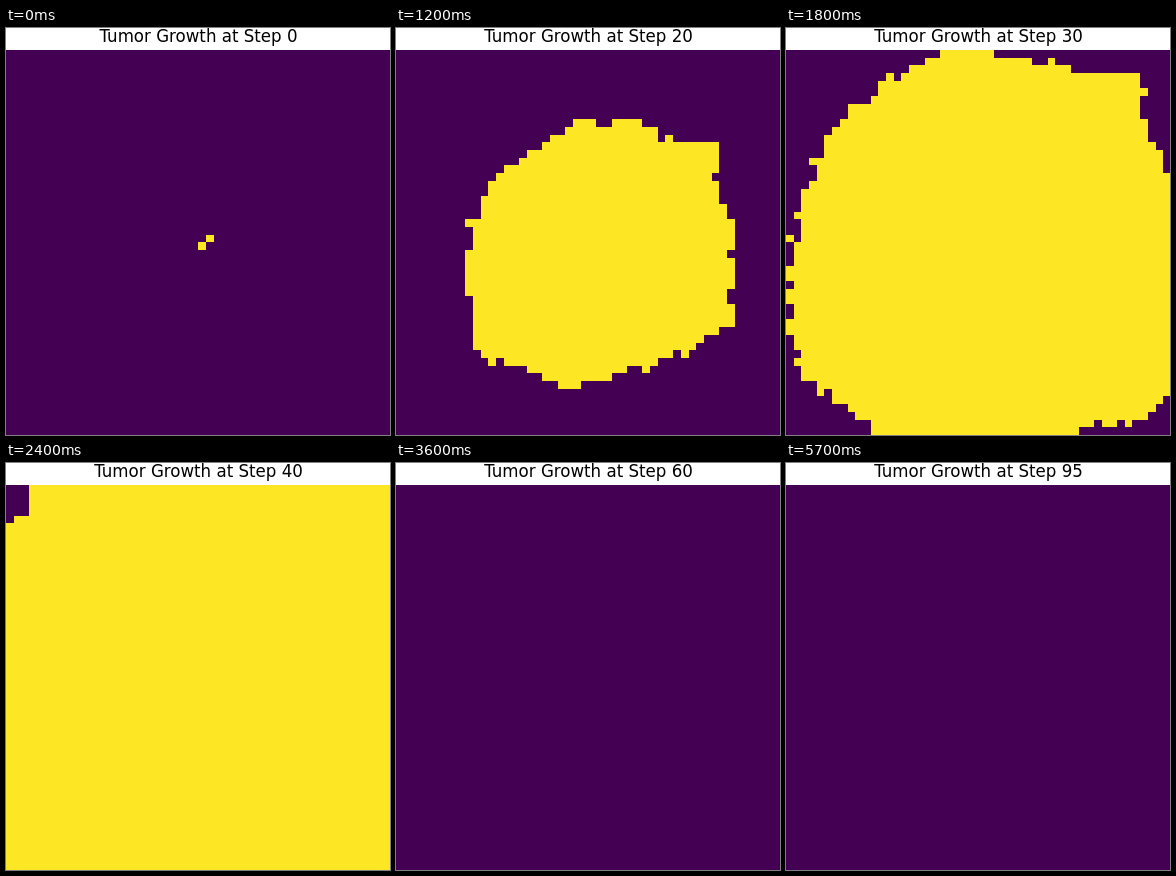
Animation, 384 px wide and 407 px high, one loop 6 s. Source, as an HTML page with a canvas:

```html
<!DOCTYPE html>
<html lang="en">
<head>
<meta charset="utf-8">
<title>Tumor Growth</title>
<style>
  html, body { margin: 0; width: 100%; height: 100%; overflow: hidden; background: #fff; }
  canvas, svg { position: absolute; left: 0; top: 0; width: 384px; height: 407px; }
  text { font: 16.667px "DejaVu Sans", sans-serif; text-anchor: middle; }
</style>
</head>
<body>
<canvas id="field" width="384" height="407"></canvas>
<svg viewBox="0 0 384 407">
  <text id="title" transform="translate(192.5 14) scale(1 1.06)">Tumor Growth at Step 0</text>
</svg>
<script>
const FRAME_MS = 300, LOOP_MS = 6000, STEPS_PER_FRAME = 5;
const GRID = 50, CELL = 7.7, TOP = 22;
const CENTER = { x: 26, y: 25 };
const ROUGHNESS = 1.2;
const FULL_STEP = 45;
const HEALTHY = '#440154', TUMOR = '#fde725';

// Corner points relative to the center, from points in grid units.
const outline = points => points.split(' ').map(point => {
  const [x, y] = point.split(',').map(Number);
  return { x: x - CENTER.x, y: y - CENTER.y };
});

// Rough shape of the tumor every ten steps; it may reach past the grid.
const outlines = [
  outline('25,26 25.95,24.95 27,24 26.05,25.05'),
  outline('26.5,16.3 35,19.4 35.6,23 33.2,25.5 35.3,30.5 31,34 24,33.2 17.3,34 19,29.5 18,24.5 21,20'),
  outline('23.5,8.8 32,9.5 35,11.7 41.7,12.3 41.7,18 44,24 44,35.3 36,40.3 21,44.2 18.5,42 11,40 9,30 10,22 13.5,16'),
  outline('23,-0.5 39,2.6 46,3.2 46.6,10 50,16 53,27 51,44 46,48.4 38,48.6 34,51 14,51 2,42.5 0,32 1.2,23 5.2,11 14,3.2'),
  outline('3.9,-0.3 25,-9 55,-5 60,27 55,55 25,60 -5,55 -9,30 0,5 3,3.6')
];

// Distance from the center to the rim in the unit direction u.
function rimDistance(points, u) {
  let farthest = 0;
  points.forEach((a, i) => {
    const b = points[(i + 1) % points.length];
    const sideA = u.x * a.y - u.y * a.x;
    const sideB = u.x * b.y - u.y * b.x;
    if ((sideA > 0) === (sideB > 0)) return;
    const k = sideA / (sideA - sideB);
    const distance = u.x * (a.x + (b.x - a.x) * k) + u.y * (a.y + (b.y - a.y) * k);
    farthest = Math.max(farthest, distance);
  });
  return farthest;
}

// Fixed for each cell, so that a cell never heals while the tumor grows.
function noise(col, row) {
  const n = Math.sin(col * 127.1 + row * 311.7) * 43758.5453;
  return n - Math.floor(n) - 0.5;
}

function isTumor(step, col, row) {
  const dx = col + 0.5 - CENTER.x, dy = row + 0.5 - CENTER.y;
  const distance = Math.hypot(dx, dy);
  const u = { x: dx / distance, y: dy / distance };
  const index = Math.floor(step / 10), mix = step % 10 / 10;
  const from = rimDistance(outlines[index], u);
  const to = mix ? rimDistance(outlines[index + 1], u) : from;
  return distance < from + (to - from) * mix + noise(col, row) * ROUGHNESS;
}

const ctx = document.getElementById('field').getContext('2d');
const title = document.getElementById('title');
const edge = i => Math.round(i * CELL - 0.01);

function draw(step) {
  title.textContent = 'Tumor Growth at Step ' + step;
  ctx.fillStyle = HEALTHY;
  ctx.fillRect(0, TOP, 384, 385);
  // A full grid is uniform, so it falls back to the lowest color.
  if (step >= FULL_STEP) return;
  ctx.fillStyle = TUMOR;
  for (let row = 0; row < GRID; row++) {
    for (let col = 0; col < GRID; col++) {
      if (!isTumor(step, col, row)) continue;
      const x = edge(col), y = edge(row);
      ctx.fillRect(x, TOP + y, edge(col + 1) - x, edge(row + 1) - y);
    }
  }
}

let shown = -1;
function tick() {
  const step = Math.floor(performance.now() % LOOP_MS / FRAME_MS) * STEPS_PER_FRAME;
  if (step !== shown) draw(shown = step);
  requestAnimationFrame(tick);
}
tick();
</script>
</body>
</html>
```
